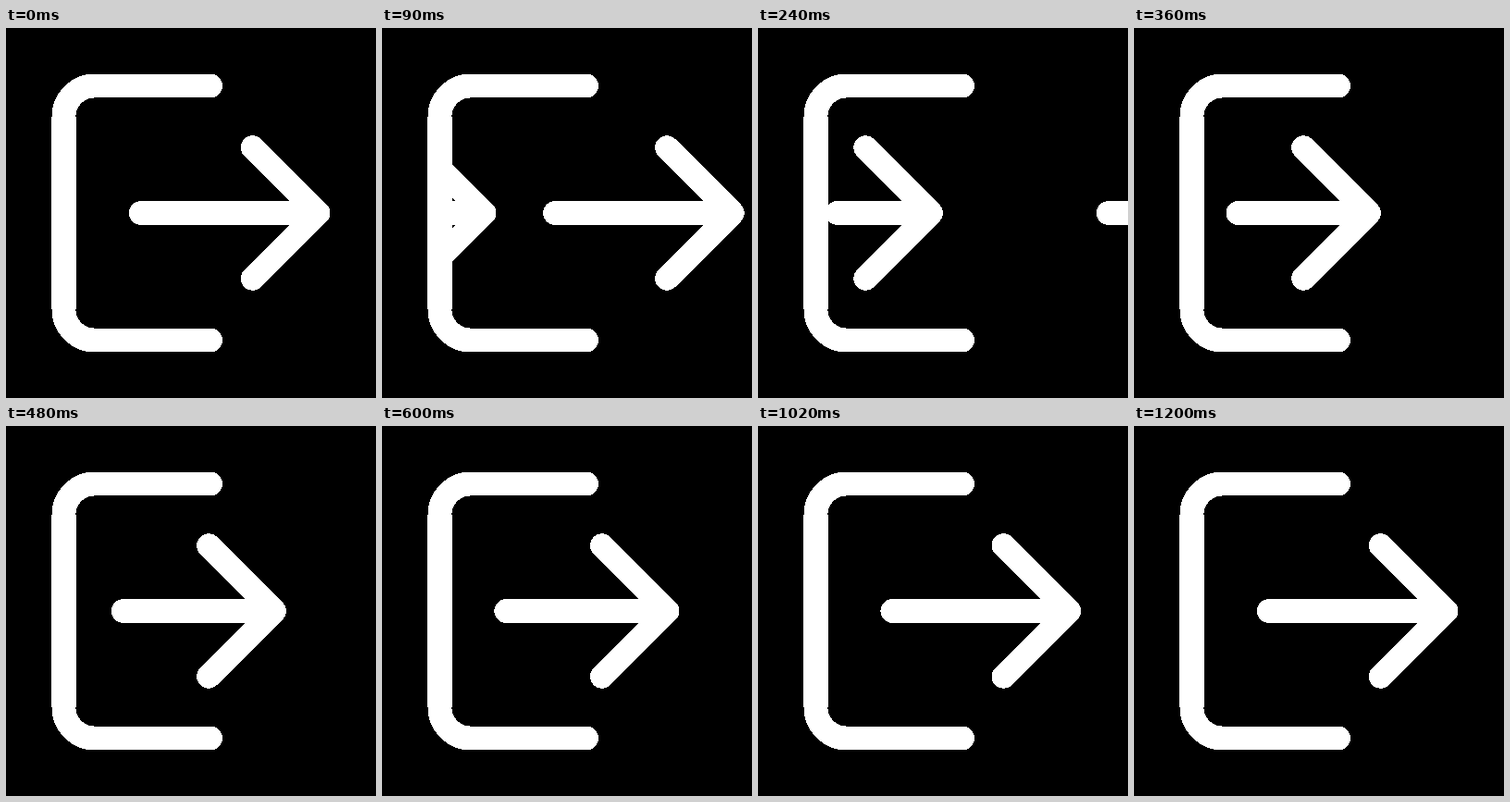
Animation of 400 by 400 pixels, one loop 1230 ms. Source, as an HTML page:

```html
<!DOCTYPE html>
<html lang="en">
<head>
<meta charset="utf-8">
<title>Exit arrow</title>
<style>
  html, body { margin: 0; width: 100%; height: 100%; overflow: hidden; background: #000; }
  svg { display: block; width: 100vw; height: 100vh; }
  path {
    fill: none; stroke: #fff; stroke-width: 25.8; stroke-linecap: round; stroke-linejoin: round;
    shape-rendering: crispEdges;
  }
  .side { stroke-width: 26.8; stroke-linecap: butt; }
</style>
</head>
<body>
<svg viewBox="0 0 400 400">
  <clipPath id="inside"><rect x="62" width="338" height="400"/></clipPath>
  <path d="M221 62.5H95.8A33.3 33.3 0 0 0 62.5 95.8V304.2A33.3 33.3 0 0 0 95.8 337.5H221"/>
  <path class="side" d="M62.5 95.8V304.2"/>
  <path id="leaving"/>
  <g clip-path="url(#inside)"><path id="entering"/></g>
</svg>
<script>
const LOOP = 1230;
const leaving = document.getElementById('leaving');
const entering = document.getElementById('entering');

// Time in ms and offset of the entering arrow's tip from its rest position
const keys = [[0, -276], [150, -196], [240, -151], [360, -84], [600, -29], [840, -8], [1200, 0]];

const speed = i => (keys[i + 1][1] - keys[i][1]) / (keys[i + 1][0] - keys[i][0]);

function slope(i) {
  if (i === 0) return speed(0);
  if (i === keys.length - 1) return 0;
  const before = keys[i][0] - keys[i - 1][0];
  const after = keys[i + 1][0] - keys[i][0];
  return (speed(i - 1) * after + speed(i) * before) / (before + after);
}

// Smooth cubic curve through the keys
function enterOffset(t) {
  const i = keys.findIndex(key => key[0] > t) - 1;
  if (i < 0) return 0;
  const [t0, x0] = keys[i], [t1, x1] = keys[i + 1];
  const span = t1 - t0, u = (t - t0) / span, v = 1 - u;
  return x0 * v * v * (1 + 2 * u) + x1 * u * u * (3 - 2 * u)
    + span * u * v * (slope(i) * v - slope(i + 1) * u);
}

function leaveOffset(t) {
  const u = Math.min(t / 570, 1);
  return 605 * u * u * (3 - 2 * u);
}

function arrow(tipOffset, tailOffset) {
  const tip = 337.5 + tipOffset, tail = 145.8 + tailOffset;
  return `M${tip - 70.8} 129.2L${tip} 200L${tip - 70.8} 270.8M${tip} 200H${tail}`;
}

function draw(now) {
  const t = now % LOOP;
  const out = leaveOffset(t), inward = enterOffset(t);
  leaving.setAttribute('d', arrow(out, out));
  entering.setAttribute('d', arrow(inward, inward * 0.4));
}

const start = performance.now();
function frame() {
  draw(performance.now() - start);
  requestAnimationFrame(frame);
}
frame();
</script>
</body>
</html>
```
